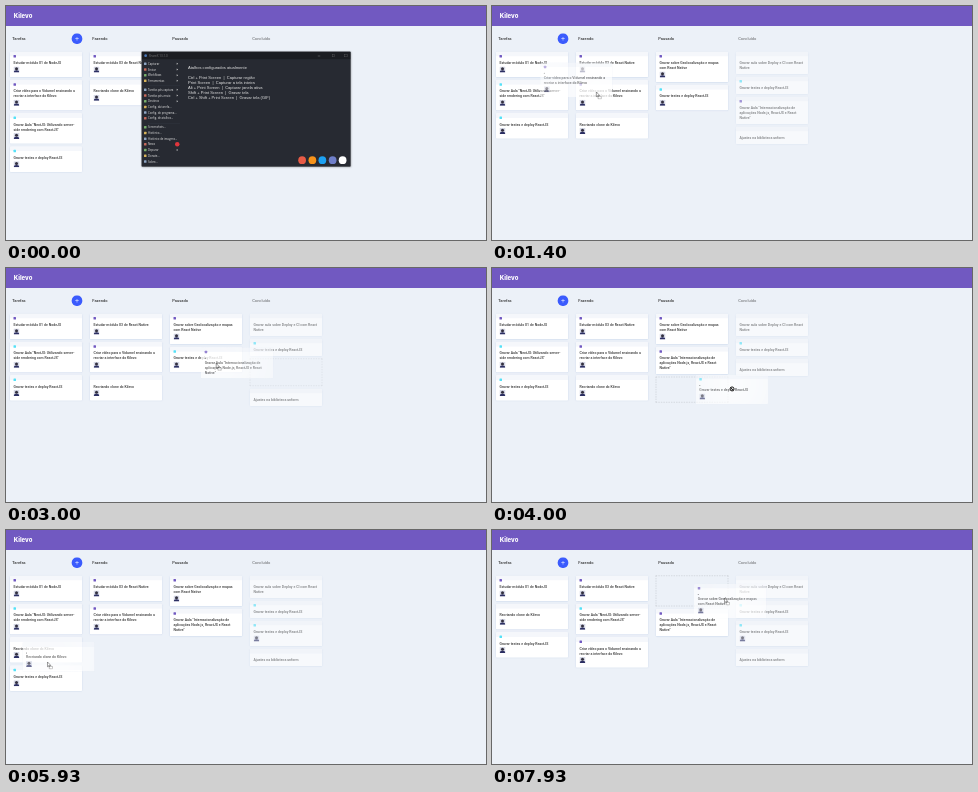
Animation, 480 px wide and 234 px high, one loop 8 s. Source, as an HTML page:

```html
<!DOCTYPE html>
<html lang="pt-BR">
<head>
<meta charset="utf-8">
<title>Quadro de tarefas</title>
<style>
* { margin: 0; padding: 0; box-sizing: border-box; }
html, body { width: 100%; height: 100%; overflow: hidden; background: #ecf1f8; }
#stage {
  position: absolute; left: 0; top: 0; width: 1920px; height: 936px; overflow: hidden;
  transform: scale(.25); transform-origin: 0 0;
  background: #ecf1f8; color: #333; font: 14px Roboto, sans-serif;
}
#bar { height: 80px; padding: 0 31px; background: #7159c1; color: #fff; font: 800 24px/80px Inter, sans-serif; }
#board { display: flex; padding: 30px 0; }
.col { flex: 0 0 320px; padding: 0 15px; }
.col.done { opacity: .6; }
.col header { display: flex; height: 42px; align-items: center; justify-content: space-between; }
.col h2 { font-weight: 500; font-size: 16px; padding: 0 10px; }
.add { width: 42px; height: 42px; border-radius: 19px; background: #3b5bfd; padding: 9px; }
.add svg { display: block; width: 24px; height: 24px; }
ul { margin-top: 30px; list-style: none; position: relative; }
.card {
  position: relative; width: 290px; margin-bottom: 10px; padding: 15px;
  border-top: 20px solid rgba(230, 236, 245, .4); border-radius: 5px;
  background: #fff; box-shadow: 0 1px 4px rgba(192, 208, 230, .8);
}
.card p { font-weight: 500; line-height: 20px; white-space: pre; }
.card i { position: absolute; left: 15px; top: -6px; width: 10px; height: 10px; border-radius: 2px; }
.card svg { display: block; width: 24px; height: 24px; margin: 5px 0 4px; border-radius: 2px; }
.card.hole { border: 2px dashed rgba(0, 0, 0, .2); padding: 33px 13px 13px; border-radius: 0; background: none; box-shadow: none; }
.card.hole > * { opacity: 0; }
#ghost, #cursor { position: absolute; left: 0; top: 0; }
#ghost .card { margin: 0; }
#cursor { width: 48px; height: 48px; margin: -16px 0 0 -16px; overflow: visible; }
#cursor g { display: none; }
#popup {
  position: absolute; left: 543px; top: 183px; width: 835px; height: 459px;
  background: #272a32; border: 1px solid #15171b; color: #e6e6e6; box-shadow: 0 2px 8px rgba(0, 0, 0, .35);
}
#popup > * { position: absolute; white-space: pre; }
.title { left: 0; right: 0; top: 0; height: 29px; padding-left: 27px; background: #1b1d22; color: #777; font: 12px/29px "Open Sans", sans-serif; }
.title b { position: absolute; width: 11px; height: 11px; top: 9px; border: 1px solid #777; }
.title i { position: absolute; left: 9px; top: 9px; width: 11px; height: 11px; border-radius: 50%; background: #4a78b8; }
.item { left: 24px; font: 11px/20px "Open Sans", sans-serif; }
.item i { position: absolute; left: -16px; top: 5px; width: 10px; height: 10px; border-radius: 2px; }
.item b { position: absolute; left: 115px; top: 6px; border: 4px solid transparent; border-left: 5px solid #ddd; }
.item u { position: absolute; left: 108px; top: 1px; width: 18px; height: 18px; border-radius: 50%; background: #e0353c; }
.rule { left: 24px; width: 128px; height: 1px; background: #3a3e48; }
.keys { left: 184px; top: 51px; font: 16.2px/20px "Liberation Sans", Arial, sans-serif; }
.dot { width: 31px; height: 31px; top: 417px; border-radius: 50%; }
</style>
</head>
<body>
<div id="stage">
  <div id="bar">Kilevo</div>
  <div id="board"></div>
  <div id="popup">
    <div class="title"><i></i>ShareX 13.1.0<b style="left:703px;height:1px;top:15px"></b><b style="left:760px"></b><b style="left:810px"></b></div>
    <div class="keys">Atalhos configurados atualmente

Ctrl + Print Screen  |  Capturar região
Print Screen  |  Capturar a tela inteira
Alt + Print Screen  |  Capturar janela ativa
Shift + Print Screen  |  Gravar tela
Ctrl + Shift + Print Screen  |  Gravar tela (GIF)</div>
  </div>
  <div id="ghost"></div>
  <svg id="cursor" viewBox="-16 -16 48 48" stroke-linejoin="round">
    <g id="arrow"><path d="M0 0V19L4.500 15L7.500 22L10.500 20.700L7.500 14H13.500Z" fill="#fff" stroke="#000" stroke-width="1.500"/></g>
    <g id="move">
      <path d="M0 0V19L4.500 15L7.500 22L10.500 20.700L7.500 14H13.500Z" fill="#fff" stroke="#000" stroke-width="1.500"/>
      <rect x="7" y="18" width="13" height="9" fill="#fff" stroke="#000" stroke-width="1.500" stroke-dasharray="2 1.500"/>
    </g>
    <g id="hand"><path d="M-5 11L-11 3Q-11 0 -8 1L-5 4V-7Q-3.500 -10 -2 -7V-9Q-.5 -12 1 -9V-7Q2.500 -10 4 -7V-4Q6 -7 8 -4V4Q8 8 5 11Z" fill="#fff" stroke="#000" stroke-width="1.800"/></g>
    <g id="deny" fill="none"><circle r="8" stroke="#fff" stroke-width="7"/><circle r="8" stroke="#111" stroke-width="4"/><path d="M-5.500 -5.500L5.500 5.500" stroke="#111" stroke-width="4"/></g>
  </svg>
</div>
<script>
const LOOP = 8000;
const $ = id => document.getElementById(id);
const PURPLE = '#7159c1', CYAN = '#54e1f7';
const FACE = '<svg viewBox="0 0 24 24"><path fill="#d5d8e6" d="M0 0h24v24H0z"/><path fill="#2c2f63" d="M1 24q0-9 11-9t11 9z"/><circle cx="12" cy="9" r="6" fill="#33303f"/></svg>';
const TESTS = 'Gravar testes e deploy ReactJS';

// name: [text, label colour, has avatar]
const cards = {
  node: ['Estudar módulo 01 de NodeJS', PURPLE, 1],
  video: ['Criar vídeo para o Vidumel ensinando a\nrecriar a interface do Kilevo', PURPLE, 1],
  next: ['Gravar Aula "NextJS: Utilizando server-\nside rendering com ReactJS"', CYAN, 1],
  testA: [TESTS, CYAN, 1],
  native: ['Estudar módulo 03 de React Native', PURPLE, 1],
  clone: ['Recriando clone do Kilevo', '', 1],
  geo: ['Gravar sobre Geolocalização e mapas\ncom React Native', PURPLE, 1],
  testB: [TESTS, CYAN, 1],
  ci: ['Gravar aula sobre Deploy e CI com React\nNative', '', 0],
  testC: [TESTS, CYAN, 0],
  intl: ['Gravar Aula "Internacionalização de\naplicações Node.js, ReactJS e React\nNative"', PURPLE, 0],
  form: ['Ajustes na biblioteca unform', '', 0]
};
const columns = [
  ['Tarefas', ['node', 'video', 'next', 'testA']],
  ['Fazendo', ['native', 'clone']],
  ['Pausado', ['geo', 'testB']],
  ['Concluído', ['ci', 'testC', 'intl', 'form']]
];

// each drag: card, start, end, grip point inside the card, move time, new column, new index
const drags = [
  { card: 'video', from: 930, to: 1870, grip: [56.25, 29.75], at: 1200, col: 1, pos: 1 },
  { card: 'intl', from: 2860, to: 3540, grip: [15.25, 16.2], at: 3050, col: 2, pos: 1 },
  { card: 'testB', from: 3870, to: 4920, grip: [36.5, 14.4], at: 4200, col: 3, pos: 2 },
  { card: 'clone', from: 5600, to: 6130, grip: [25.25, 20], at: 5800, col: 0, pos: 2 },
  { card: 'next', from: 6440, to: 6930, grip: [38, 24], at: 6600, col: 1, pos: 1 },
  { card: 'geo', from: 7460, to: LOOP, grip: [30.5, 14.6], at: Infinity }
];

// pointer path: time, x, y
const path = [
  [250, 215, 128], [870, 60, 103.5], [930, 60, 103.5], [1200, 84, 94], [1400, 104.3, 86],
  [1730, 118, 82], [2070, 118, 82], [2800, 259, 106.7], [2870, 259, 106.7], [3000, 210.3, 95.5],
  [3130, 196, 87], [3330, 189, 93], [3530, 189, 93], [3730, 200, 123], [3870, 200, 123],
  [4000, 240, 121], [4200, 252, 108], [4530, 261, 106], [5070, 261, 106], [5400, 109, 127],
  [5600, 109, 127], [5800, 62, 131], [5930, 41.5, 132], [6130, 41, 130], [6330, 41.75, 97.75],
  [6470, 41.75, 97.75], [6600, 84, 90], [6670, 106, 86], [6870, 118, 80], [6950, 118, 80],
  [7270, 187, 61.5], [7450, 187, 61.5], [7470, 194, 60], [7560, 180, 66], [7650, 169, 72],
  [7730, 189, 71], [7800, 189, 71], [7870, 206, 74], [7930, 232.5, 68], [LOOP, 232.5, 68]
];

function makeCard(name) {
  const [text, color, face] = cards[name];
  const el = document.createElement('li');
  el.className = 'card';
  el.innerHTML = (color ? `<i style="background:${color}"></i>` : '') + `<p>${text}</p>` + (face ? FACE : '');
  return el;
}

const nodes = {};
for (const name in cards) nodes[name] = makeCard(name);

const lists = columns.map(([title], i) => {
  const col = document.createElement('section');
  col.className = i === 3 ? 'col done' : 'col';
  const add = '<div class="add"><svg viewBox="0 0 24 24"><path fill="#fff" d="M19 13h-6v6h-2v-6H5v-2h6V5h2v6h6z"/></svg></div>';
  col.innerHTML = `<header><h2>${title}</h2>${i ? '' : add}</header><ul></ul>`;
  $('board').append(col);
  return col.lastChild;
});

function buildPopup() {
  const items = ['Capturar', 'Enviar', 'Workflows', 'Ferramentas', 'Tarefas pós-captura', 'Tarefas pós-envio',
    'Destinos', 'Config. da tarefa...', 'Config. do programa...', 'Config. de atalhos...', 'Screenshots...',
    'Histórico...', 'Histórico de imagens...', 'News', 'Depurar', 'Donate...', 'Sobre...'];
  const tints = ['#8fa6c4', '#d8b45a', '#79b06c', '#c86b5c'];
  let html = '';
  items.forEach((text, i) => {
    const y = 37 + i * 22.8 + (i > 3) * 13 + (i > 9) * 13;
    const more = i < 7 || i === 14 ? '<b></b>' : i === 13 ? '<u></u>' : '';
    html += `<div class="item" style="top:${y}px"><i style="background:${tints[i * 3 % 4]}"></i>${text}${more}</div>`;
  });
  for (const y of [135, 285]) html += `<div class="rule" style="top:${y}px"></div>`;
  ['#e85b46', '#f7931a', '#1da1f2', '#6f7fc9', '#fff'].forEach((color, i) => {
    html += `<div class="dot" style="left:${625 + i * 40.5}px;background:${color}"></div>`;
  });
  $('popup').insertAdjacentHTML('beforeend', html);
}

function pointer(t) {
  let i = 1;
  while (i < path.length - 1 && path[i][0] < t) i++;
  const [t0, x0, y0] = path[i - 1], [t1, x1, y1] = path[i];
  const k = Math.min(1, Math.max(0, (t - t0) / (t1 - t0)));
  return [x0 + (x1 - x0) * k, y0 + (y1 - y0) * k];
}

let shown = '';
function layout(t, drag) {
  const moved = drags.filter(d => t >= d.at);
  const key = moved.length + '/' + (drag ? drag.card : '');
  if (key === shown) return;
  shown = key;
  const order = columns.map(c => c[1].slice());
  for (const d of moved) {
    for (const o of order) if (o.includes(d.card)) o.splice(o.indexOf(d.card), 1);
    order[d.col].splice(d.pos, 0, d.card);
  }
  lists.forEach((ul, i) => ul.replaceChildren(...order[i].map(n => nodes[n])));
  for (const n in nodes) nodes[n].classList.toggle('hole', !!drag && drag.card === n && t < drag.at);
  $('ghost').replaceChildren();
  if (drag) {
    const el = makeCard(drag.card), [x, y] = drag.grip;
    el.style.maskImage = el.style.webkitMaskImage =
      `radial-gradient(circle 270px at ${x * 4}px ${y * 4 - 20}px, rgba(0,0,0,.82), rgba(0,0,0,.4))`;
    $('ghost').append(el);
  }
}

function cursorKind(t, drag, x, y) {
  if (drag) return drag.card === 'testB' && t > 3950 && t < 4190 ? 'deny' : 'move';
  const i = Math.floor(x / 80), inside = Math.abs(x - i * 80 - 40) < 36.25;
  return inside && lists[i] && y * 4 < 182 + lists[i].offsetHeight ? 'hand' : 'arrow';
}

function render(t) {
  const drag = drags.find(d => t >= d.from && t < d.to);
  layout(t, drag);
  const [x, y] = pointer(t);
  if (drag) $('ghost').style.transform = `translate(${(x - drag.grip[0]) * 4}px, ${(y - drag.grip[1]) * 4}px)`;
  $('cursor').style.transform = `translate(${x * 4}px, ${y * 4}px)`;
  const kind = t < 250 ? '' : cursorKind(t, drag, x, y);
  for (const g of $('cursor').children) g.style.display = g.id === kind ? 'inline' : 'none';
  const fade = Math.min(1, Math.max(0, (t - 60) / 190));
  $('popup').style.opacity = 1 - fade;
  $('popup').style.transform = `scale(${1 - .08 * fade})`;
}

buildPopup();
const start = performance.now();
function tick() {
  render((performance.now() - start) % LOOP);
  requestAnimationFrame(tick);
}
tick();
</script>
</body>
</html>
```
